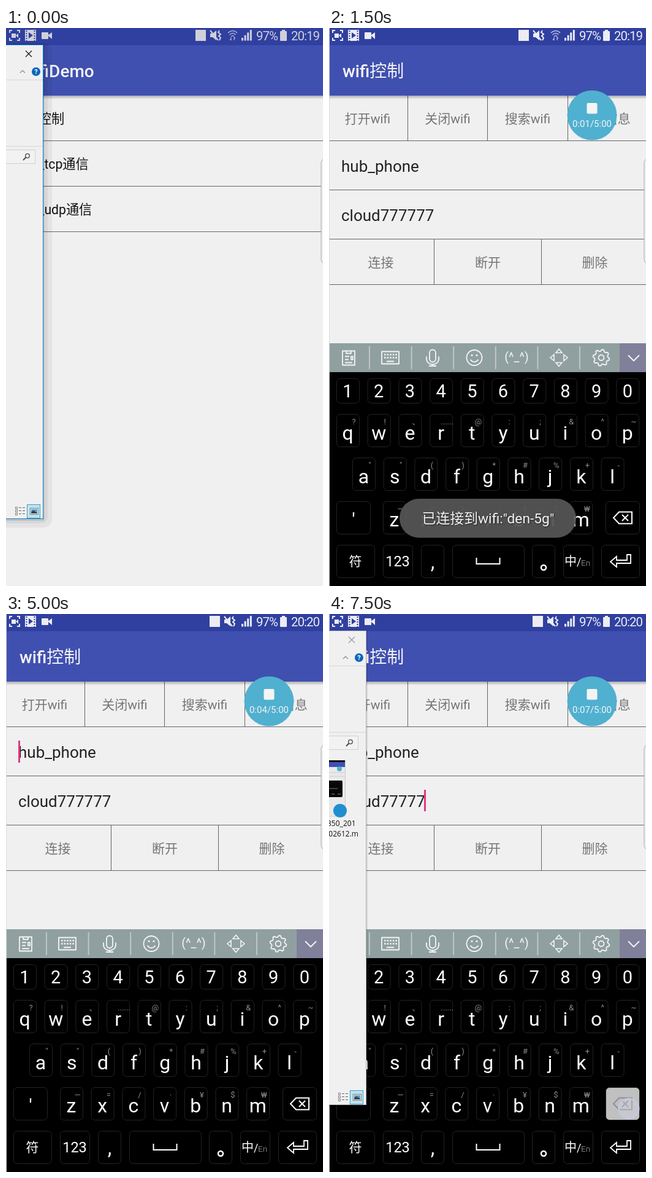
Write an HTML page that moves like this. It is 517 by 908 pixels and loops after 8000 ms.

```html
<!DOCTYPE html>
<html lang="zh-CN">
<head>
<meta charset="utf-8">
<title>Wifi demo</title>
<style>
  html, body { margin: 0; width: 100%; height: 100%; overflow: hidden; background: #f0f0f0; }
  svg { display: block; width: 517px; height: 908px; }
  text { font-family: Roboto, "Noto Sans CJK SC", "Noto Sans CJK", sans-serif; white-space: pre; }
  .status text { font-size: 20.5px; letter-spacing: -1px; }
  .file { font: 12px "Open Sans", "Noto Sans", sans-serif; }
</style>
</head>
<body>
<svg id="stage" viewBox="0 0 517 908" xmlns="http://www.w3.org/2000/svg"></svg>
<script>
const STEP = 500, STEPS = 16;

const rect = (x, y, w, h, fill, extra = '') =>
  `<rect x="${x}" y="${y}" width="${w}" height="${h}" fill="${fill}" ${extra}/>`;
const text = (x, y, size, fill, content, extra = '') =>
  `<text x="${x}" y="${y}" font-size="${size}" fill="${fill}" ${extra}>${content}</text>`;
const label = (x, y, size, fill, content, extra = '') =>
  text(x, y, size, fill, content, 'text-anchor="middle" ' + extra);
const path = (d, stroke, width = 1, extra = '') =>
  `<path d="${d}" fill="none" stroke="${stroke}" stroke-width="${width}" ${extra}/>`;
const circle = (x, y, r, fill, extra = '') =>
  `<circle cx="${x}" cy="${y}" r="${r}" fill="${fill}" ${extra}/>`;
const group = (id, content, extra = '') => `<g id="${id}" ${extra}>${content}</g>`;

const RULE = '#666';
const hLines = ys => path(ys.map(y => `M-2 ${y + .5}H522`).join(''), RULE);

function appPage(id, title, content) {
  return group(id,
    rect(-2, 28, 545, 880, '#f0f0f0') + content +
    rect(-2, 110, 545, 6, 'url(#drop)') +
    rect(-2, 28, 545, 82, '#4050b0', 'class="bar"') +
    text(22, 80, 28, '#f4f4f4', title, 'font-weight="500"'));
}

function listPage() {
  const items = ['wifi控制', 'wifi_tcp通信', 'wifi_udp通信'];
  return appPage('list', 'WifiDemo',
    items.map((s, i) => text(20, 155 + 74 * i, 21.2, '#111', s)).join('') +
    hLines([183, 257, 331]));
}

function controlPage() {
  const top = ['打开wifi', '关闭wifi', '搜索wifi', 'wifi信息'];
  const bottom = ['连接', '断开', '删除'];
  return appPage('control', 'wifi<tspan font-weight="400">控制</tspan>',
    top.map((s, i) => label(63 + 130.5 * i, 155, 21, '#757575', s)).join('') +
    bottom.map((s, i) => label(84.5 + 174.5 * i, 388.5, 21, '#757575', s)).join('') +
    hLines([183, 263, 343, 417]) +
    path('M128.5 110V183M258.5 110V183M389.5 110V183M171.5 343V417M346.5 343V417', RULE) +
    text(20, 234, 26, '#222', 'hub_phone') +
    text(20, 314, 26, '#222', '', 'id="secret"') +
    rect(0, 206, 3, 36, '#e4397f', 'id="caret"'));
}

function statusBar() {
  const left =
    path('M6 8V4H10M18 4H22V8M22 16V20H18M10 20H6V16', 'currentColor', 2) +
    rect(9, 9, 7, 7, 'currentColor') + '<path d="M16 12L20 9V16Z" fill="currentColor"/>' +
    rect(31, 3, 18, 18, 'currentColor') +
    path('M33.5 4V21M46.5 4V21', '#303f9f', 2, 'stroke-dasharray="2 2"') +
    '<path d="M37 7L44 12L37 17Z" fill="#303f9f"/>' +
    rect(58, 7, 11, 11, 'currentColor', 'rx="1"') +
    '<path d="M68 12L75 7V18Z" fill="currentColor"/>';
  const alerts =
    rect(309, 3, 17, 18, 'currentColor') +
    '<path d="M333 9H337L343 4V20L337 15H333Z" fill="currentColor"/>' +
    path('M333 4L346 20', 'currentColor', 2) +
    path('M348 4L346 7L350 10L347 13L350 16L348 20', 'currentColor', 2);
  const wifi =
    path('M362 8Q370 1 377 8M364.5 11Q370 6 374.5 11M367 14Q370 11 372 14', 'currentColor', 1.6) +
    path('M367 15V20M365 18L367 20M372 20V15M372 15L374 17', 'currentColor', 1.3);
  const bars = [0, 1, 2, 3].map(i =>
    rect(384 + 4.6 * i, 16 - 4.3 * i, 3, 4.5 + 4.3 * i, 'currentColor')).join('');
  return group('status', rect(0, 0, 517, 28, '#303f9f', 'id="statusBg"') + left +
    group('alerts', alerts) + group('wifi', wifi, 'opacity=".75"') + bars +
    text(408, 20, 20.5, 'currentColor', '97%') +
    rect(447, 5, 11, 16, 'currentColor', 'rx="1"') + rect(450, 3, 5, 3, 'currentColor') +
    text(465, 20, 20.5, 'currentColor', '', 'id="clock"'), 'class="status"');
}

function toolbar() {
  const at = (x, content) => `<g transform="translate(${x} 536.5)">${content}</g>`;
  const ink = (d, w = 1.8) => path(d, '#f4f4f4', w, 'stroke-linejoin="round"');
  const gear = Array.from({ length: 32 }, (_, i) => {
    const r = i % 4 < 2 ? 13.5 : 10.8, a = (i + .5) * Math.PI / 16;
    return `${(r * Math.cos(a)).toFixed(1)} ${(r * Math.sin(a)).toFixed(1)}`;
  }).join('L');
  const arrows = [0, 90, 180, 270].map(a =>
    path('M-5 -8L0 -14L5 -8Z', '#f4f4f4', 1.6, `transform="rotate(${a})"`)).join('');
  const dividers = [0, 1, 2, 3, 4, 5].map(i => `M${66 + 68.6 * i} 518V555`).join('');
  return rect(0, 513, 517, 47, '#90a0a0', 'id="toolbarBg"') + rect(474, 513, 43, 47, '#80809a') +
    path(dividers, '#c4caca', 1.8) +
    at(32, ink('M-10 -11H10V12H-10ZM-4 -11V-7H4V-11M-6 -2H1M-6 3H0M-6 8H6M4 -2H7V3H4Z')) +
    at(100, ink('M-14 -10H14V10H-14Z') +
      path('M-10 -5H11M-10 0H11', '#f4f4f4', 2.6, 'stroke-dasharray="2.6 2"') + ink('M-6 6H6', 2)) +
    at(169, ink('M-5 -8A5 5 0 0 1 5 -8V2A5 5 0 0 1 -5 2ZM-10 -2V2A10 9 0 0 0 10 2V-2M0 11V14M-6 13.5H6')) +
    at(237, circle(0, 0, 12.5, 'none', 'stroke="#f4f4f4" stroke-width="1.8"') +
      circle(-4, -4, 1.6, '#f4f4f4') + circle(4, -4, 1.6, '#f4f4f4') + ink('M-6.5 3Q0 11 6.5 3')) +
    label(306, 542, 20, '#f4f4f4', '(^_^)') +
    at(375, arrows) +
    at(444, ink(`M${gear}Z`) + circle(0, 0, 4.5, 'none', 'stroke="#f4f4f4" stroke-width="1.8"')) +
    at(497, ink('M-9 -4L0 5L9 -4', 2));
}

function keyboard() {
  const PITCH = 50.7;
  const key = (x, y, w, h = 53, extra = '') =>
    rect(x + .5, y + .5, w - 1, h, '#000', `rx="6" stroke="#242424" ${extra}`);
  const row = (x, y, h, chars, hints, size, base) => [...chars].map((c, i) => {
    const left = x + PITCH * i;
    return key(left, y, 38, h) + label(left + 18.5, base, size, '#fff', c) +
      (hints[i] ? label(left + 28.5, y + 17, 13, '#8c8c8c', hints[i]) : '');
  }).join('');
  const wide = [[12, 63], [88, 49], [150, 38], [201, 118], [331, 38], [382, 49], [444, 63]];
  return group('keyboard',
    rect(0, 560, 517, 396, '#000') + toolbar() +
    row(12, 570, 40, '1234567890', [], 29, 601) +
    row(12, 628, 53, 'qwertyuiop', ['?', '!', '、', '......', '@', ':', ';', '&amp;', '^', '~'], 32, 670) +
    row(38, 699, 53, 'asdfghjkl', ['"', '"', '(', ')', '*', '#', '%', '+', '-'], 32, 741) +
    key(12, 770, 56) + label(40, 811, 32, '#fff', "'") +
    row(88, 770, 53, 'zxcvbnm', ['—', '=', '/', '·', '¥', '$', '₩'], 32, 811) +
    key(451, 770, 56, 53, 'id="deleteKey"') +
    path('M464 797L473 787.5H494V806.5H473ZM478 792L488 802M488 792L478 802', '#fff', 2, 'id="deleteIcon"') +
    wide.map(([x, w]) => key(x, 841, w)).join('') +
    label(43, 875, 21, '#fff', '符') + label(112, 876, 23.5, '#fff', '123') +
    label(169, 880, 33, '#fff', ',') +
    path('M240.5 862V872H278.5V862', '#fff', 2) +
    circle(350, 878, 4, 'none', 'stroke="#fff" stroke-width="2.5"') +
    label(394, 875, 20, '#fff', '中') + text(404, 875, 18, '#fff', '/') + text(411, 875, 13.5, '#777', 'En') +
    path('M486 857H492V871H469V877L459 868.5L469 860V866H486Z', '#fff', 1.8));
}

const toast = () => group('toast',
  rect(115, 766, 288, 63.5, '#555', 'rx="31.7" opacity=".95"') +
  label(259.5, 806, 22.8, '#f4f4f4', '已连接到wifi:"den-5g"', 'style="text-shadow:1px 1px 2px #222"'));

const bubble = () => group('bubble',
  circle(0, 0, 40.5, '#50b0d0', 'id="disc"') +
  rect(-8.5, -20, 17, 17.5, '#f4f4f4', 'rx="2"') +
  label(0, 18.5, 15, '#f4f4f4', '', 'id="counter"'));

function explorer() {
  const file = group('file',
    rect(0, 238, 27, 91, '#e9e9ea') + rect(0, 238, 27, 3, '#111') + rect(0, 241, 27, 8, '#3f51b5') +
    circle(17, 252, 4, '#50b0d0') + path('M0 258H27M0 264H27', '#ccc') +
    rect(-4, 271, 26, 27, '#080808', 'rx="2"') + path('M4 293H9M14 293H19', '#888') +
    path('M0 284H14', '#777') + path('M26.5 238V329H0', '#ccc') +
    circle(18, 320, 11, '#1f8fd0') +
    text(43.5, 345, 12, '#111', '350_201', 'class="file" text-anchor="end"') +
    text(48, 362, 12, '#111', '02612.m', 'class="file" text-anchor="end"'));
  return group('explorer',
    group('glow', rect(-30, 24, 105, 789, '#000', 'rx="14" opacity=".055"') +
      rect(-30, 25, 98, 781, '#000', 'rx="10" opacity=".05"')) +
    rect(-30, 26, 93, 776, '#000', 'rx="3" opacity=".1"') +
    rect(-5, 27.5, 65.5, 771, '#f0f0f0', 'id="frame"') +
    path('M32 37L42 47M42 37L32 47', '#111', 1.2, 'id="close"') +
    path('M23 73L27 69L31 73', '#888', 1.2) +
    circle(49, 71, 7, '#0a66ba') + label(49, 75, 11, '#fff', '?', 'font-weight="700"') +
    path('M0 84.5H60M0 192.5H60', '#d6d6d6') +
    rect(-5, 198.5, 52.5, 22, '#f2f2f2', 'stroke="#d0d0d0"') +
    circle(35, 208, 3.3, 'none', 'stroke="#444" stroke-width="1.3"') + path('M32.5 210.5L28 215', '#444', 1.8) +
    file +
    [780, 785, 790].map(y => rect(15.5, y - .5, 3, 3, 'none', 'stroke="#888"') +
      path(`M21 ${y + .5}H25M27 ${y + .5}H31`, '#666')).join('') +
    rect(34.5, 775.5, 21, 22, '#bfe3ee', 'stroke="#3aa3cb"') +
    rect(39.5, 781.5, 13, 10, '#fff', 'stroke="#777"') + rect(41, 783, 10, 7, '#5aa0d0') +
    '<path d="M41 790V787L45 785L51 789V790Z" fill="#345"/>');
}

document.getElementById('stage').innerHTML =
  `<defs><linearGradient id="drop" x2="0" y2="1"><stop stop-color="#000" stop-opacity=".28"/>
   <stop offset="1" stop-color="#000" stop-opacity="0"/></linearGradient></defs>` +
  listPage() + rect(0, 28, 517, 880, '#000', 'id="dim" opacity=".33"') +
  controlPage() + keyboard() + toast() +
  rect(514, 212.5, 20, 171, '#f0f0f0', 'rx="7" stroke="#aaa"') +
  statusBar() + rect(0, 0, 1, 908, '#dcdce2', 'id="edge"') +
  bubble() +
  circle(0, 0, 16.3, '#d8d8f0', 'id="touch" fill-opacity=".3" stroke="#c6c8e4" stroke-width="2.4"') +
  explorer();

const $ = id => document.getElementById(id);
const set = (id, attrs) => Object.entries(attrs).forEach(([k, v]) => $(id).setAttribute(k, v));
const show = (id, on) => { $(id).style.display = on ? '' : 'none'; };
const move = (id, x, y, s = 1) => set(id, { transform: `translate(${x} ${y}) scale(${s})` });

function render(step) {
  const entering = step === 2, vivid = step === 1 || entering;
  const inControl = step >= 2, deleting = step === 15;

  document.querySelectorAll('.bar').forEach(b => b.setAttribute('fill', vivid ? '#3040b0' : '#4050b0'));
  set('statusBg', { fill: vivid ? '#202f8f' : '#3040a0' });
  $('status').style.color = step ? '#ececf2' : '#d0d0d8';
  move('alerts', step >= 6 ? 23 : 0, 0);
  show('wifi', step < 6);
  $('clock').textContent = step >= 7 ? '20:20' : '20:19';

  show('list', step <= 2);
  move('list', entering ? -22 : 0, 0);
  show('dim', entering);
  show('control', inControl);
  move('control', entering ? 5 : 0, 0);
  show('edge', step >= 3);

  $('secret').textContent = 'cloud' + '7'.repeat(deleting ? 5 : 6);
  const inSecret = step >= 13;
  show('caret', inSecret ? step % 2 : step % 2 === 0);
  set('caret', inSecret
    ? { x: deleting ? 155 : 170, y: 286, height: 35 }
    : { x: 20, y: 206, height: 36 });

  show('keyboard', inControl);
  move('keyboard', 0, entering ? 48 : 0);
  set('keyboard', { opacity: entering ? .56 : 1 });
  set('toolbarBg', { fill: vivid ? '#9a9a9a' : '#90a0a0' });
  set('deleteKey', { fill: deleting ? '#c0c0c0' : '#000' });
  set('deleteIcon', { stroke: deleting ? '#909090' : '#fff' });

  show('toast', inControl && step < 6);
  set('toast', { opacity: entering ? .72 : 1 });

  show('bubble', step >= 1);
  move('bubble', 429, step === 1 ? 166 : 142, step === 1 ? .41 : 1);
  set('disc', { fill: vivid ? '#40a0c0' : '#50b0d0' });
  $('counter').textContent = `0:0${Math.max(0, Math.floor((step - 1) / 2))}/5:00`;

  show('touch', step === 1 || deleting);
  move('touch', deleting ? 489 : 228, deleting ? 805 : 163);

  show('explorer', step === 0 || step >= 11);
  show('file', step >= 12);
  show('glow', !deleting);
  set('frame', { stroke: deleting ? '#b4b4b4' : '#0c80d8' });
  set('close', { stroke: deleting ? '#999' : '#111' });
}

let shown = -1;
function tick(now) {
  const step = Math.floor(now / STEP) % STEPS;
  if (step !== shown) render(shown = step);
  requestAnimationFrame(tick);
}
render(0);
requestAnimationFrame(tick);
</script>
</body>
</html>
```
